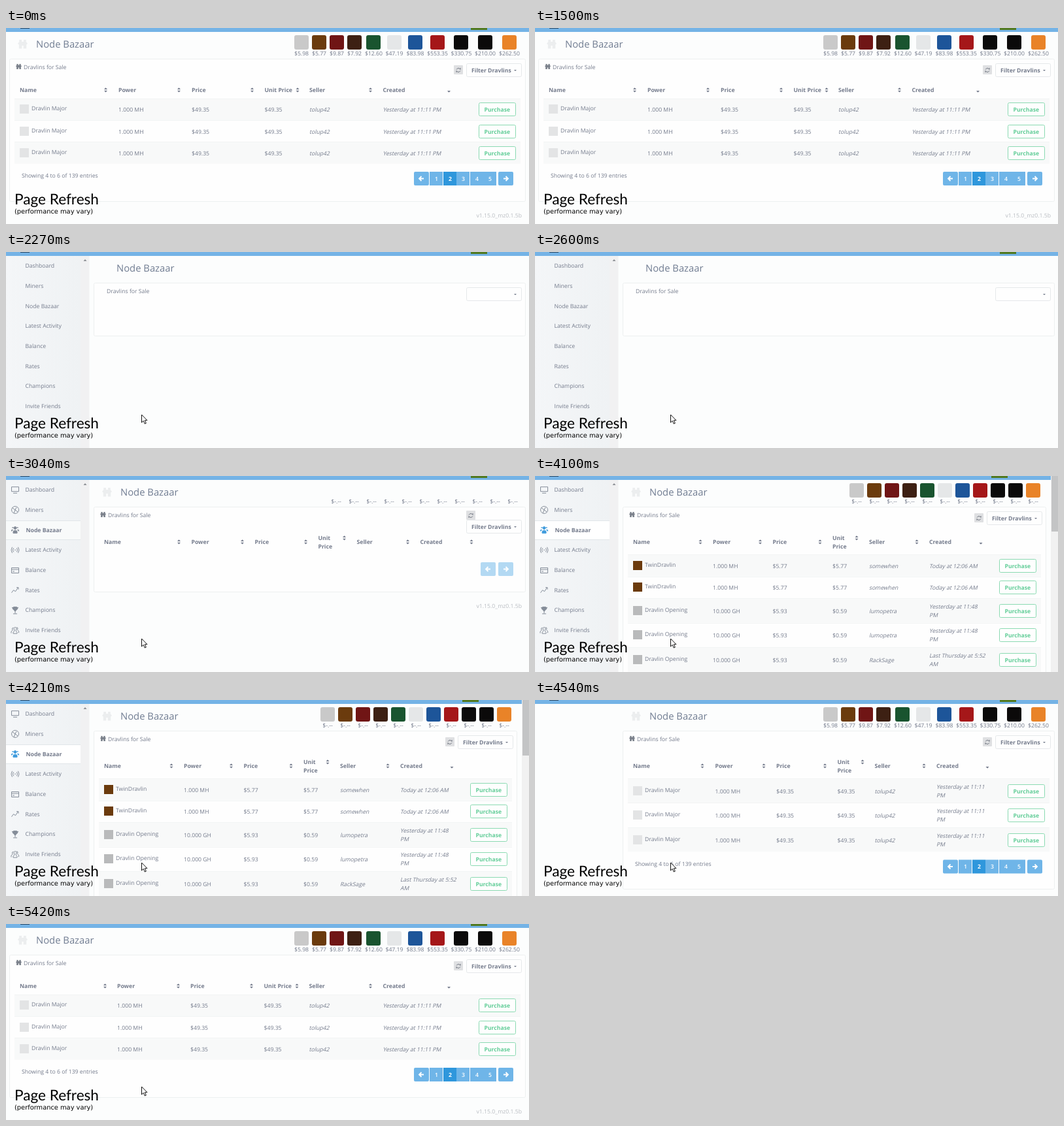
Write an HTML page that moves like this. It is 800 by 300 pixels and loops after 6.62 s.

```html
<!DOCTYPE html>
<html lang="en">
<head>
<meta charset="utf-8">
<title>Page Refresh</title>
<style>
html, body { margin: 0; width: 100%; height: 100%; overflow: hidden; background: #fcfdfd; }
svg { display: block; width: 800px; height: 300px; }
text { font: 8.67px 'Open Sans', sans-serif; fill: #747b8c; text-rendering: geometricPrecision; }
.bold { font-weight: 700; }
.title { font-size: 14.8px; fill: #717d92; }
.mid { text-anchor: middle; }
.end { text-anchor: end; fill: #b9bdc2; }
.green { fill: #62cd98; font-weight: 700; }
.white { fill: #fff; font-weight: 600; }
.white.current { font-weight: 700; }
.caption { font: 22.6px Lato, sans-serif; fill: #000; }
.note { font: 9.85px 'DejaVu Sans', sans-serif; fill: #000; }
</style>
</head>
<body>
<svg viewBox="0 0 800 300">
  <defs>
    <linearGradient id="side"><stop stop-color="#f4f6f8"/><stop offset="1" stop-color="#eff2f4"/></linearGradient>
  </defs>
  <rect width="800" height="300" fill="#fcfdfd"/>
  <g id="page"></g>
  <path id="cursor" d="M207.5 249v12l2.8-2.6 2 4.6 2-.9-2-4.4h3.7z" fill="#fff" stroke="#111"/>
  <text class="caption" x="13" y="270">Page Refresh</text>
  <text class="note" x="13" y="284">(performance may vary)</text>
</svg>
<script>
const LOOP = 6620;
const GREY = '#747b8c';

const text = (x, y, content, cls = '') => `<text x="${x}" y="${y}" class="${cls}">${content}</text>`;
const slanted = (x, y, content) => `<text transform="translate(${x} ${y}) skewX(-13)">${content}</text>`;
const rect = (x, y, w, h, fill, extra = '') =>
  `<rect x="${x}" y="${y}" width="${w}" height="${h}" fill="${fill}" ${extra}/>`;
const outline = (x, y, w, h, color) =>
  rect(x + .5, y + .5, w - 1, h - 1, '#fefefe', `stroke="${color}" rx="2"`);
const path = (d, fill) => `<path d="${d}" fill="${fill}"/>`;
const lines = (d, color, width = 1) => `<path d="${d}" fill="none" stroke="${color}" stroke-width="${width}"/>`;

const down = (x, y) => path(`M${x - 2.5} ${y}h5l-2.5 2.7z`, GREY);
const sorter = (x, y) => path(`M${x - 2.5} ${y - 1}h5l-2.5-2.8z`, GREY) + down(x, y + .8);
const binoculars = (x, y, size, color) => `<g transform="translate(${x} ${y}) scale(${size / 10})">` +
  path('M1.5 0h2.5v2h2v-2h2.5v2l1.5 2-1.2 1v4h-3v-3h-1.6v3h-3v-4l-1.2-1 1.5-2z', color) + '</g>';

function topBar(right = 800) {
  const shift = right < 800 ? -13 : 0;
  return rect(0, 0, right, 6, '#74b3e6') + rect(22, 0, 14, 1, '#2c4a66') +
    rect(711 + shift, 0, 25, 3, '#527a22');
}

const NAV = [
  ['Dashboard', 'M.5 1.5h11v7h-11zM3 11h6'],
  ['Miners', 'M6 .5a5.5 5.5 0 1 0 .1 0M2 3l4 3 2-4M4 11l2-5 4 3'],
  ['Node Bazaar', 'M4 3a2 2 0 1 1 4 0a2 2 0 1 1-4 0M1.5 3a1 1 0 1 1 2 0M8.500 3a1 1 0 1 1 2 0M3 11v-3q3-3 6 0v3zM.5 8v-2h2.500M11.500 8v-2h-2.500', true],
  ['Latest Activity', 'M6 5v2M3.5 3q-2 3 0 6M8.5 3q2 3 0 6M1.5 1.5q-3 4.5 0 9M10.5 1.5q3 4.5 0 9'],
  ['Balance', 'M.5 2.5h11v8h-11zM1 5h10M2 8h3'],
  ['Rates', 'M.5 10l3-4 3 2 4-6M8 2h3v3'],
  ['Champions', 'M3.5 1h5v4l-2.5 3-2.5-3zM1 2h2v3M11 2h-2v3M6 8v3M3 11.5h6', true],
  ['Invite Friends', 'M3 11v-2l2-2-1-4 2-2 2 2-1 4 2 2v2zM8 1.5l2 1-.5 3 2 2v2.5M3.5 2l-2 1 .5 3-2 2v2.5']
];

function sidebar(active, x = 0) {
  let out = rect(0, 6, 114, 294, 'url(#side)') + rect(114, 6, 13.5, 294, '#f1f1f2') +
    path('M118.5 14h5l-2.5-3z', '#8d9095');
  if (active) out += rect(0, 68, 114, 30, active === 'blue' ? '#fff' : '#f8fafa') + lines('M0 68.5h114M0 97.5h114', '#e1e6e9');
  NAV.forEach(([label, icon, solid], i) => {
    const y = 24.2 + i * 30.7, chosen = active && i === 2;
    if (active) {
      const color = chosen && active === 'blue' ? '#439ddd' : '#858d99';
      out += `<g transform="translate(8 ${y - 9})">` +
        `<path d="${icon}" fill="${solid ? color : 'none'}" stroke="${color}"/></g>`;
    }
    out += text(chosen ? 30.5 : 29.5, y, label, chosen ? 'bold' : '');
  });
  return `<g transform="translate(${x})">${out}</g>`;
}

function heading({ left, right, bottom, bare, stacked }) {
  const titleX = left + (bare ? 35 : 41), labelX = left + (bare ? 20 : 22);
  const filterY = stacked ? 67 : 54, refreshX = right - (stacked ? 91 : 110), refreshY = stacked ? 53 : 57;
  const caretX = right - 16, caretY = filterY + 10;
  let out = outline(left, 47, right - left, bottom - 47, '#edf0f0') +
    text(titleX, 30, 'Node Bazaar', 'title') + text(labelX, 62.5, 'Dravlins for Sale') +
    outline(right - 91, filterY, 85, 21, '#e5e8ea') + path(`M${caretX - 2} ${caretY}h4l-2 2z`, GREY);
  if (bare) return out;
  const cx = refreshX + 7, cy = refreshY + 7.5;
  return out + binoculars(titleX - 28, 18, 15, '#eceeef') + binoculars(labelX - 12, 55, 9, '#7c828c') +
    rect(refreshX, refreshY, 14, 14, '#dfe0e2', 'rx="1"') +
    lines(`M${cx - 3} ${cy - 1}q3-4 6 0v-2.5M${cx + 3} ${cy + 1}q-3 4-6 0v2.5`, '#6f7580') +
    text(right - 83, filterY + 13.5, 'Filter Dravlins', 'bold');
}

const TILES = ['#c9c9c9', '#6b3b0d', '#701515', '#3d2013', '#19542f', '#e5e7e8', '#1d5599', '#a51719', '#0b0a0a', '#0b0a0a', '#e98328'];
const PRICES = ['5.98', '5.77', '9.87', '7.92', '12.60', '47.19', '83.98', '553.35', '330.75', '210.00', '262.50'];
const PRICE_X = [452, 479, 506, 533, 562.5, 594, 626, 660, 696.5, 733, 770];

function tiles({ known, start, blank }) {
  return TILES.map((color, i) => {
    const x = known ? PRICE_X[i] : start + 27 * i;
    return (blank ? '' : rect(Math.floor(x - 11), 11, 22, 22, color, 'rx="3"')) +
      text(x, 42.2, '$' + (known ? PRICES[i] : '-.--'), 'mid');
  }).join('');
}

const HEADERS = ['Name', 'Power', 'Price', 'Unit Price', 'Seller', 'Created'];

function headers({ cols, sorts, headY, wrap, rows }) {
  return HEADERS.map((label, i) => {
    const split = wrap && i === 3;
    const title = split
      ? text(cols[i], headY - 6, 'Unit', 'bold') + text(cols[i], headY + 6.5, 'Price', 'bold')
      : text(cols[i], headY, label, 'bold');
    return title + (rows && i === 5 ? down(sorts[i], headY - 2) : sorter(sorts[i], headY - (split ? 9 : 3)));
  }).join('');
}

function tableRows({ left, right, cols, rows }) {
  return rows.map((row, i) => {
    const mid = Math.round(row.top + row.height / 2), base = mid + 3.7;
    const values = [row.power, row.price, row.unit];
    const dates = row.date.map((part, k) =>
      slanted(cols[5], base + (k - (row.date.length - 1) / 2) * 12.5, part)).join('');
    return (i % 2 ? '' : rect(left + 8, row.top, right - left - 16, row.height, '#f8f9f9')) +
      lines(`M${left + 8} ${Math.round(row.top) + .5}H${right - 8}`, '#f2f4f4') +
      rect(cols[0], mid - 7, 14, 14, row.icon) + text(cols[0] + 18, base - 1.5, row.name) +
      values.map((value, k) => text(cols[k + 1], base, value)).join('') +
      slanted(cols[4], base, row.seller) + dates +
      outline(right - 72, mid - 10, 57, 21, '#8bdab2') + text(right - 43.7, base, 'Purchase', 'green mid');
  }).join('');
}

const arrow = (x, y, dir) =>
  lines(`M${x - 3.5 * dir} ${y}h${6.5 * dir}M${x} ${y - 3.5}l${3.5 * dir} 3.5l${-3.5 * dir} 3.5`, '#fff', 1.8);

function pager(y, loading) {
  const color = loading ? '#b3d9f3' : '#6fb5e8', backX = loading ? 726 : 624;
  let out = rect(backX, y, 23, 21, color, 'rx="2"') + rect(753, y, 23, 21, color, 'rx="2"') +
    arrow(backX + 11.5, y + 10.5, -1) + arrow(764.5, y + 10.5, 1);
  if (loading) return out;
  for (let n = 1; n <= 5; n++) {
    const x = 648 + Math.round((n - 1) * 20.6), current = n === 2;
    out += rect(x, y, 20, 21, current ? '#2f97dc' : color) +
      text(x + 10.5, y + 13.5, n, `white mid ${current ? 'current' : ''}`);
  }
  return out;
}

const footer = (left, y) => text(left + 19, y + 9.2, 'Showing 4 to 6 of 139 entries') + pager(y);
const version = y => text(789, y, 'v1.15.0_mz0.1.5b', 'end');

const majorRows = (top, height, date) => [0, 1, 2].map(i => ({
  top: top + i * height, height, date, icon: '#e3e4e5', name: 'Dravlin Major',
  power: '1.000 MH', price: '$49.35', unit: '$49.35', seller: 'tolup42'
}));
const twin = top => ({
  top, height: 33.5, date: ['Today at 12:06 AM'], icon: '#6b3b0d', name: 'TwinDravlin',
  power: '1.000 MH', price: '$5.77', unit: '$5.77', seller: 'somewhen'
});
const opening = (top, seller, date) => ({
  top, height: 37.5, date, seller, icon: '#b9babb', name: 'Dravlin Opening',
  power: '10.000 GH', price: '$5.93', unit: '$0.59'
});

function market(layout) {
  return topBar(layout.topRight) + heading(layout) + tiles(layout) + headers(layout) +
    (layout.rows ? tableRows(layout) : '');
}

function widePage(cols, sorts) {
  return market({
    left: 5, right: 795, bottom: 266, known: true, headY: 98, cols, sorts,
    rows: majorRows(107.7, 33.3, ['Yesterday at 11:11 PM'])
  }) + footer(5, 220) + version(290);
}

const skeleton = topBar() + sidebar() + heading({ left: 134, right: 795, bottom: 129, bare: true });

const loading = market({
  left: 134, right: 795, bottom: 178, stacked: true, start: 505, blank: true, headY: 104, wrap: true,
  cols: [150, 283.5, 380.5, 477.5, 536.5, 633.5], sorts: [264.5, 361.5, 458.5, 517.5, 614.5, 712]
}) + sidebar('grey') + pager(132, true) + version(202);

const yesterday = ['Yesterday at 11:48', 'PM'];
const firstPage = market({
  left: 134, right: 782, bottom: 320, topRight: 789, start: 492, headY: 104, wrap: true,
  cols: [150, 272, 363.5, 455, 511, 603], sorts: [253, 344.5, 436, 492, 584, 682],
  rows: [twin(120), twin(153.5), opening(187, 'lumopetra', yesterday), opening(224.5, 'lumopetra', yesterday),
    opening(262, 'RackSage', ['Last Thursday at 5:52', 'AM'])]
}) + rect(789, 0, 11, 300, '#f1f1f1') + rect(790, 0, 10, 85, '#c3c4c5') + sidebar('blue');

const secondPage = market({
  left: 134, right: 795, bottom: 290, known: true, headY: 104, wrap: true,
  cols: [150, 275.5, 369, 462.5, 519.5, 614], sorts: [256, 350, 443.5, 501, 595, 692],
  rows: majorRows(120, 37.4, ['Yesterday at 11:11', 'PM'])
}) + footer(134, 244.5);

const before = widePage([21, 172, 284, 395.5, 464, 576.5], [152.5, 264.5, 376.5, 446, 557.5, 677.5]);
const after = widePage([21, 170, 282, 394.5, 463.5, 576.5], [151.5, 263.5, 375.5, 445, 557.5, 677.5]);

const SCENES = [
  [0, before], [1940, topBar()], [2160, skeleton], [3040, loading], [4100, firstPage],
  [4320, secondPage + sidebar('blue')], [4430, secondPage + sidebar('blue', -64)],
  [4540, secondPage], [4760, after]
];

const page = document.getElementById('page');
const cursor = document.getElementById('cursor');
page.innerHTML = SCENES.map(([, markup]) => `<g display="none">${markup}</g>`).join('');

const started = performance.now();
function draw() {
  const t = (performance.now() - started) % LOOP;
  const current = SCENES.findLastIndex(([start]) => t >= start);
  [...page.children].forEach((scene, i) => scene.setAttribute('display', i === current ? 'inline' : 'none'));
  cursor.setAttribute('display', t >= 2160 ? 'inline' : 'none');
  requestAnimationFrame(draw);
}
draw();
</script>
</body>
</html>
```
